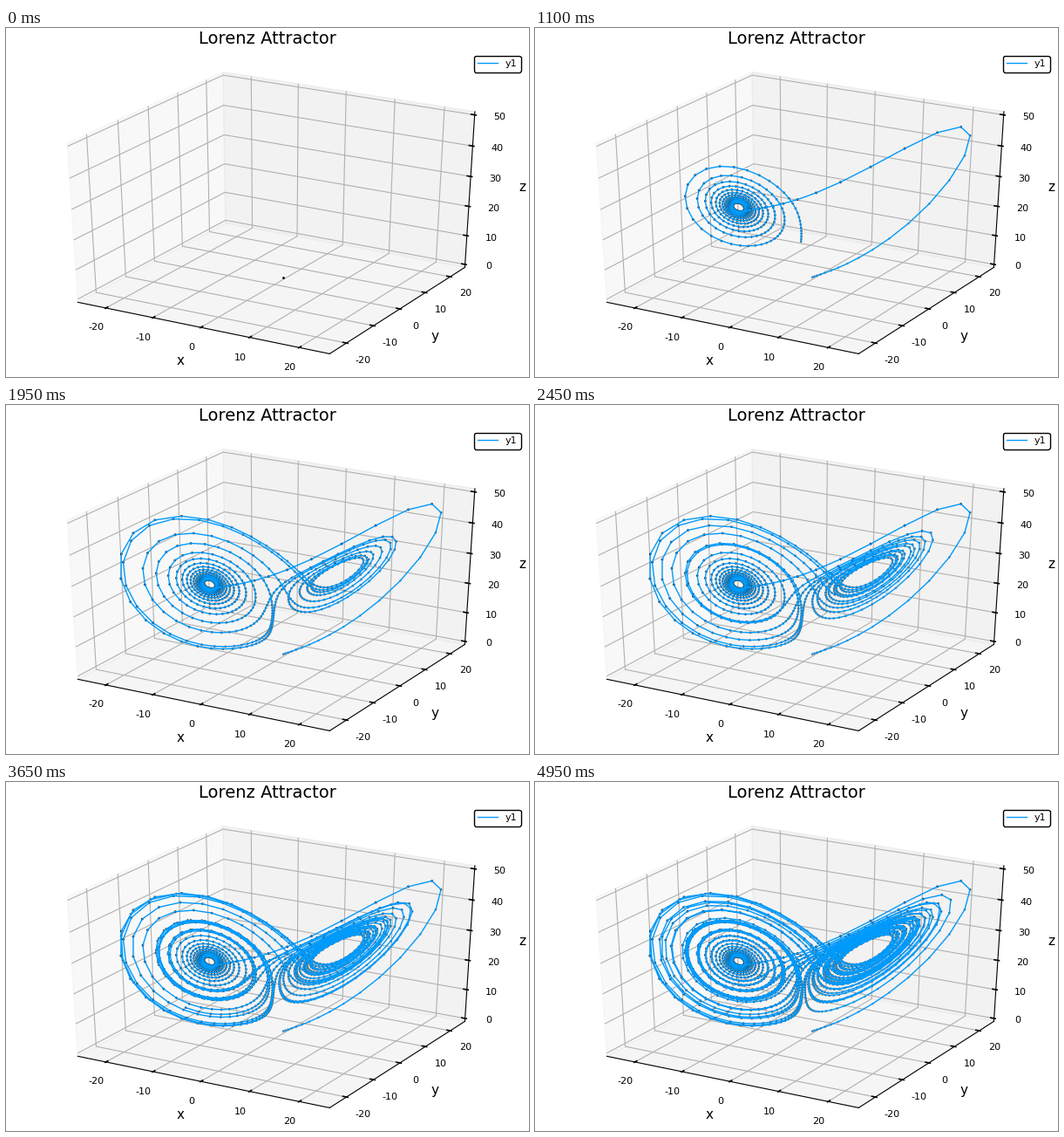
Write a matplotlib script that moves like this. It is 600 px wide and 400 px high and loops after 5000 ms.

```python
import numpy as np
import matplotlib.pyplot as plt
from matplotlib.animation import FuncAnimation
from matplotlib.patches import Polygon

plt.rcParams["font.family"] = "DejaVu Sans"

W, H = 600, 400
FRAMES, STEPS = 100, 20      # curve points added per frame
BLUE, GRID = "#009afa", "#b0b0b0"

# Axes box in pixels and its view window
MARGIN, TOP = 3.94, 26.2
VIEW = (-0.095, 0.090)

# Scene: x and y span -25..25, z spans 0..50; walls sit slightly outside
SPAN = 50
DELTA = SPAN / 12
LO, HI = -25 - DELTA / 4, 25 + DELTA / 4
ZLO, ZHI = LO + 25, HI + 25
DIST = 10


def project(points):
    """Perspective view from azimuth -60, elevation 30: screen xy and depth."""
    p = (np.atleast_2d(points) - [0, 0, 25]) / SPAN
    az, el = np.radians([-60, 30])
    eye = np.array([np.cos(el) * np.cos(az), np.cos(el) * np.sin(az), np.sin(el)])
    right = np.array([-np.sin(az), np.cos(az), 0])
    up = np.cross(eye, right)
    depth = DIST - p @ eye
    return np.column_stack([p @ right, p @ up]) / depth[:, None], depth


def lorenz(n, dt=0.02):
    s, r, b = 10.0, 28.0, 8 / 3
    x = y = z = 1.0
    path = []
    for _ in range(n):
        dx = s * (y - x)
        x += dt * dx
        dy = x * (r - z) - y
        y += dt * dy
        dz = x * y - b * z
        z += dt * dz
        path.append((x, y, z))
    return np.array(path)


fig = plt.figure(figsize=(W / 100, H / 100), dpi=100, facecolor="white")
ax = fig.add_axes([MARGIN / W, MARGIN / H,
                   1 - 2 * MARGIN / W, 1 - (MARGIN + TOP) / H])
ax.set(xlim=VIEW, ylim=VIEW)
ax.axis("off")


def pane(shade, corners):
    ax.add_patch(Polygon(project(corners)[0], color=(shade,) * 3 + (0.5,),
                         lw=1, zorder=0))


def stroke(points, color, lw, zorder, cap="butt"):
    ax.plot(*project(points)[0].T, color=color, lw=lw, zorder=zorder,
            solid_capstyle=cap)


def label(point, text, size, va):
    x, y = project(point)[0][0]
    ax.text(x, y, text, size=size, ha="center", va=va)


pane(0.95, [(LO, LO, ZLO), (LO, HI, ZLO), (LO, HI, ZHI), (LO, LO, ZHI)])
pane(0.90, [(LO, HI, ZLO), (HI, HI, ZLO), (HI, HI, ZHI), (LO, HI, ZHI)])
pane(0.925, [(LO, LO, ZLO), (HI, LO, ZLO), (HI, HI, ZLO), (LO, HI, ZLO)])

# Distances of tick labels and axis names from the axis lines
per_point = 48 / (72 * (W - 2 * MARGIN + H - MARGIN - TOP) / 100)
TICK_GAP = 11.5 * per_point * DELTA
NAME_GAP = 25 * per_point * DELTA

# For each axis: name, tick values, place at value t moved out by (tick, gap),
# and the grid line that belongs to t
AXES = [
    ("x", range(-20, 21, 10), (LO, HI),
     lambda t, out, gap: (t, LO - out - gap, ZLO - gap),
     lambda t: [(t, LO, ZLO), (t, HI, ZLO), (t, HI, ZHI)]),
    ("y", range(-20, 21, 10), (LO, HI),
     lambda t, out, gap: (HI + out + gap, t, ZLO - gap),
     lambda t: [(HI, t, ZLO), (LO, t, ZLO), (LO, t, ZHI)]),
    ("z", range(0, 51, 10), (ZLO, ZHI),
     lambda t, out, gap: (HI + out + gap, HI + gap, t),
     lambda t: [(HI, HI, t), (LO, HI, t), (LO, LO, t)]),
]

for name, ticks, ends, place, grid in AXES:
    stroke([place(e, 0, 0) for e in ends], "black", 0.8, 1.2, "projecting")
    for t in ticks:
        stroke(grid(t), GRID, 0.8, 1)
        stroke([place(t, 0.1 * DELTA, 0), place(t, -0.2 * DELTA, 0)],
               "black", 1.5 * 0.8, 1.3)
        label(place(t, 0, TICK_GAP), str(t), 8, "top")
    label(place(sum(ends) / 2, 0, NAME_GAP), name, 11, "center")

ax.set_title("Lorenz Attractor", fontsize=14, pad=6, y=1)

path = lorenz(STEPS * (FRAMES - 1) + 1)
xy, depth = project(path)

dots = ax.scatter([], [], s=1, lw=1, zorder=2)
curve, = ax.plot([], [], color=BLUE, lw=1, zorder=3, label="y1",
                 solid_joinstyle="round")
legend = ax.legend(handles=[curve], loc="upper right", fontsize=8,
                   facecolor="white", edgecolor="black", framealpha=1)
legend.set_zorder(5)


def draw(frame):
    n = STEPS * frame + 1
    # Far dots fade to 30 % opacity
    z = -1 / depth[:n]
    fade = 1 - 0.7 * (z - z.min()) / max(np.ptp(z), 1e-12)
    ink = np.zeros((n, 4))
    ink[:, 3] = fade
    fill = np.tile([0, 0.604, 0.98, 1], (n, 1))
    fill[:, 3] = fade
    dots.set_offsets(xy[:n])
    dots.set_edgecolor(ink)
    dots.set_facecolor(fill)
    curve.set_data(xy[:n, 0], xy[:n, 1])
    return dots, curve


anim = FuncAnimation(fig, draw, frames=FRAMES, interval=50,
                     repeat=True, repeat_delay=0, blit=False)
plt.show()
```
